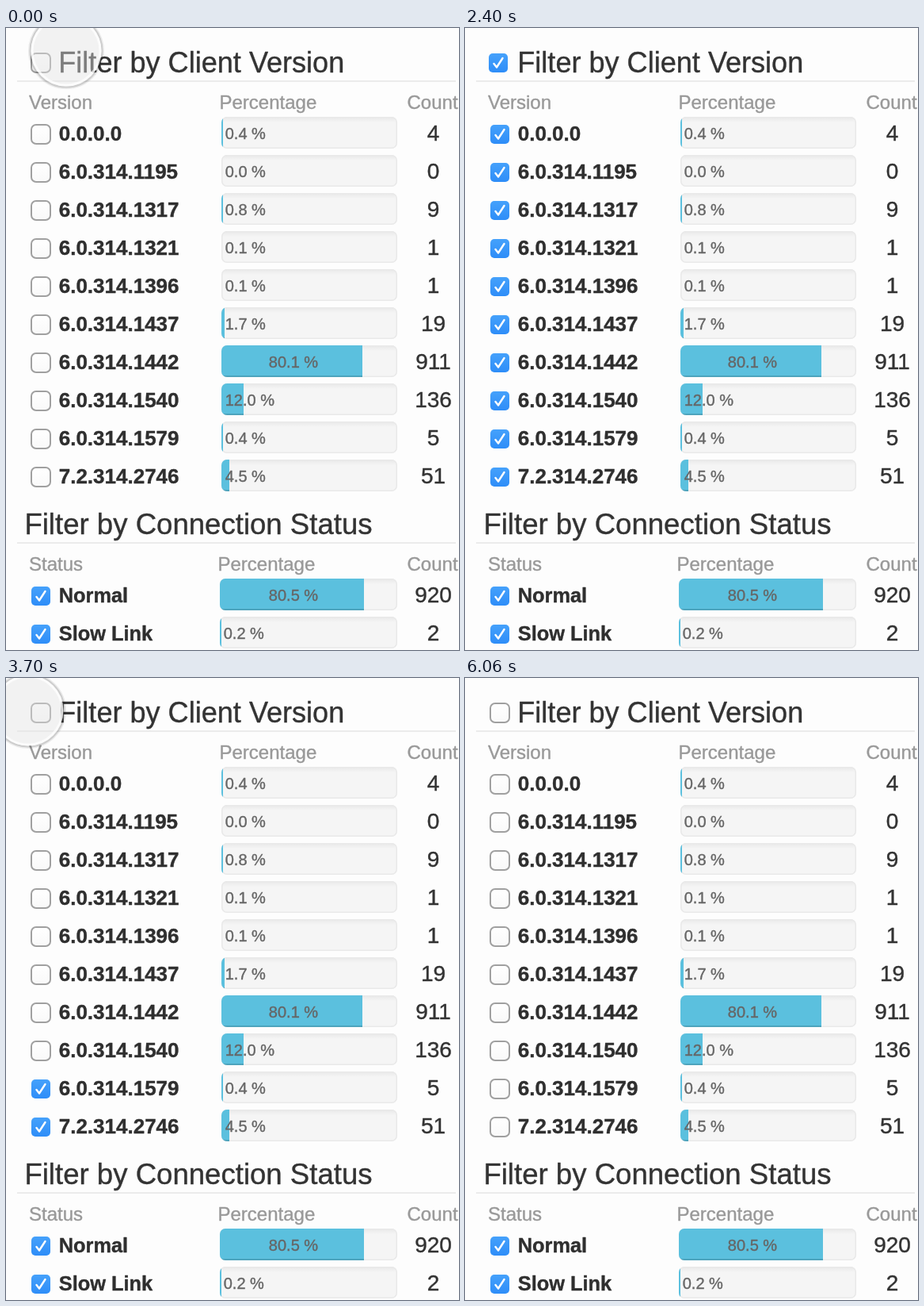
An HTML page with a canvas for the animation above (6340 ms loop, 572 by 784 pixels).

```html
<!DOCTYPE html>
<html lang="en">
<head>
<meta charset="utf-8">
<title>Filter list</title>
<style>
  html, body { margin: 0; width: 100%; height: 100%; overflow: hidden; background: #fdfdfd; }
  canvas { display: block; }
</style>
</head>
<body>
<canvas id="stage" width="572" height="784"></canvas>
<script>
const ctx = document.getElementById('stage').getContext('2d');
const LOOP = 6340;

const versions = [
  ['0.0.0.0', 0.4, 4], ['6.0.314.1195', 0, 0], ['6.0.314.1317', 0.8, 9],
  ['6.0.314.1321', 0.1, 1], ['6.0.314.1396', 0.1, 1], ['6.0.314.1437', 1.7, 19],
  ['6.0.314.1442', 80.1, 911], ['6.0.314.1540', 12, 136],
  ['6.0.314.1579', 0.4, 5], ['7.2.314.2746', 4.5, 51]
];
const statuses = [['Normal', 80.5, 920], ['Slow Link', 0.2, 2]];

// Pointer stops: time, x, y; null hides it until the next stop.
const pointerPath = [
  [0, 76, 29], [20, 76, 29], [140, 43, 41], [300, 42, 41], [1540, 41, 41],
  [1960, -52, 90], null, [2380, -52, 90], [2960, 28, 41], [4000, 28, 41],
  [4200, -45.5, 90], [4800, -45.5, 90], null
];

const clamp = v => Math.max(0, Math.min(1, v));
const ease = v => (1 - Math.cos(Math.PI * clamp(v))) / 2;
const mix = (a, b, p) => a + (b - a) * p;

// A hairline outline gives the slightly heavier screen rendering.
function text(str, x, y, size, color, weight = '', align = 'left') {
  ctx.font = `${weight} ${size}px "Liberation Sans", Arial, sans-serif`;
  ctx.fillStyle = ctx.strokeStyle = color;
  ctx.textAlign = align;
  ctx.lineWidth = 0.4;
  ctx.fillText(str, x, y);
  ctx.strokeText(str, x, y);
}

function roundBox(x, y, w, h, r) {
  ctx.beginPath();
  ctx.roundRect(x, y, w, h, r);
}

function verticalFade(y, h, top, bottom) {
  const g = ctx.createLinearGradient(0, y, 0, y + h);
  g.addColorStop(0, top);
  g.addColorStop(1, bottom);
  return g;
}

function emptyBox(x, y) {
  roundBox(x - 12, y - 12, 24, 24, 6);
  ctx.fillStyle = verticalFade(y - 12, 24, '#fff', '#f9f9f9');
  ctx.fill();
  ctx.strokeStyle = '#a0a0a0';
  ctx.lineWidth = 2;
  ctx.stroke();
}

function checkedBox(x, y) {
  roundBox(x - 12, y - 12, 24, 24, 5);
  ctx.fillStyle = verticalFade(y - 12, 24, '#45a1fb', '#2e8df8');
  ctx.fill();
  ctx.beginPath();
  ctx.moveTo(x - 5.5, y + 1);
  ctx.lineTo(x - 2, y + 5.5);
  ctx.lineTo(x + 5.5, y - 6);
  ctx.strokeStyle = '#fff';
  ctx.lineWidth = 2.4;
  ctx.lineCap = ctx.lineJoin = 'round';
  ctx.stroke();
}

function bar(x, y, percent) {
  const width = 494 - x;
  const filled = percent > 0.1 ? 2 * Math.ceil(width * percent / 200) : 0;
  ctx.save();
  roundBox(x, y, width, 40, 7);
  ctx.clip();
  ctx.fillStyle = verticalFade(y, 7, '#e8e8e8', '#f5f5f5');
  ctx.fillRect(x, y, width, 40);
  ctx.strokeStyle = '#e9e9e9';
  ctx.lineWidth = 3;
  roundBox(x, y, width, 40, 7);
  ctx.stroke();
  ctx.fillStyle = '#5bc0de';
  ctx.fillRect(x, y, filled, 40);
  ctx.fillStyle = 'rgba(0,0,0,.15)';
  ctx.fillRect(x, y + 38, filled, 2);
  ctx.restore();
  const label = percent.toFixed(1) + ' %';
  if (percent > 50) text(label, x + filled / 2 + 2, y + 28, 20, '#666', '', 'center');
  else text(label, x + 4.7, y + 28, 20, '#666');
}

function row([name, percent, count], y, barX, checked, size) {
  (checked ? checkedBox : emptyBox)(44, y + 1);
  text(name, 66.7, y + 9, size, '#2f2f2f', 'bold');
  bar(barX, y - 21, percent);
  text(count, 539.5, y + 9, 28, '#333', '', 'center');
}

function section(title, x, y, size, label, barX) {
  text(title, x, y, size, '#333');
  ctx.fillStyle = '#ebebeb';
  ctx.fillRect(14, y + 10, 554, 2);
  text(label, 29, y + 46, 24, '#999');
  text('Percentage', barX - 4.5, y + 46, 24, '#999');
  text('Count', 506.5, y + 46, 24, '#999');
}

function pointer(t) {
  const i = pointerPath.findLastIndex(p => p && p[0] <= t);
  const from = pointerPath[i], to = pointerPath[i + 1];
  if (!to) return;
  const p = ease((t - from[0]) / (to[0] - from[0]));
  const x = mix(from[1], to[1], p), y = mix(from[2], to[2], p);
  const ring = (r, width, color) => {
    ctx.beginPath();
    ctx.arc(x, y, r, 0, 2 * Math.PI);
    ctx.lineWidth = width;
    ctx.strokeStyle = color;
    ctx.stroke();
  };
  ctx.beginPath();
  ctx.arc(x, y, 44, 0, 2 * Math.PI);
  ctx.fillStyle = 'rgba(226,226,226,.42)';
  ctx.fill();
  ring(46, 4, 'rgba(0,0,0,.07)');
  ring(45.5, 2, 'rgba(0,0,0,.13)');
  ring(43, 3, 'rgba(255,255,255,.75)');
}

// A loose empty box flies up the column, then fades.
function flyingBox(t) {
  if (t < 660 || t >= 1000) return;
  ctx.globalAlpha = 1 - clamp((t - 920) / 80);
  emptyBox(44, mix(566, 71, ease((t - 650) / 270)));
  ctx.globalAlpha = 1;
}

function draw(t) {
  ctx.fillStyle = '#fdfdfd';
  ctx.fillRect(0, 0, 572, 784);

  section('Filter by Client Version', 66.3, 56, 36.1, 'Version', 274);
  if (t >= 300 && t < 3420) checkedBox(42, 44);
  else emptyBox(44, 44);
  versions.forEach((v, i) => {
    const checked = t >= 300 + 36 * (i + 1) && t < 3420 + 34 * (i + 1);
    row(v, 133 + 48 * i, 272, checked, 26);
  });

  section('Filter by Connection Status', 23.4, 638, 36.6, 'Status', 272);
  statuses.forEach((s, i) => row(s, 715 + 48 * i, 270, true, 25.4));

  flyingBox(t);
  pointer(t);
}

const start = performance.now();
function tick() {
  const t = (performance.now() - start) % LOOP;
  draw(Math.floor(t / 20) * 20);
  requestAnimationFrame(tick);
}
tick();
</script>
</body>
</html>
```
